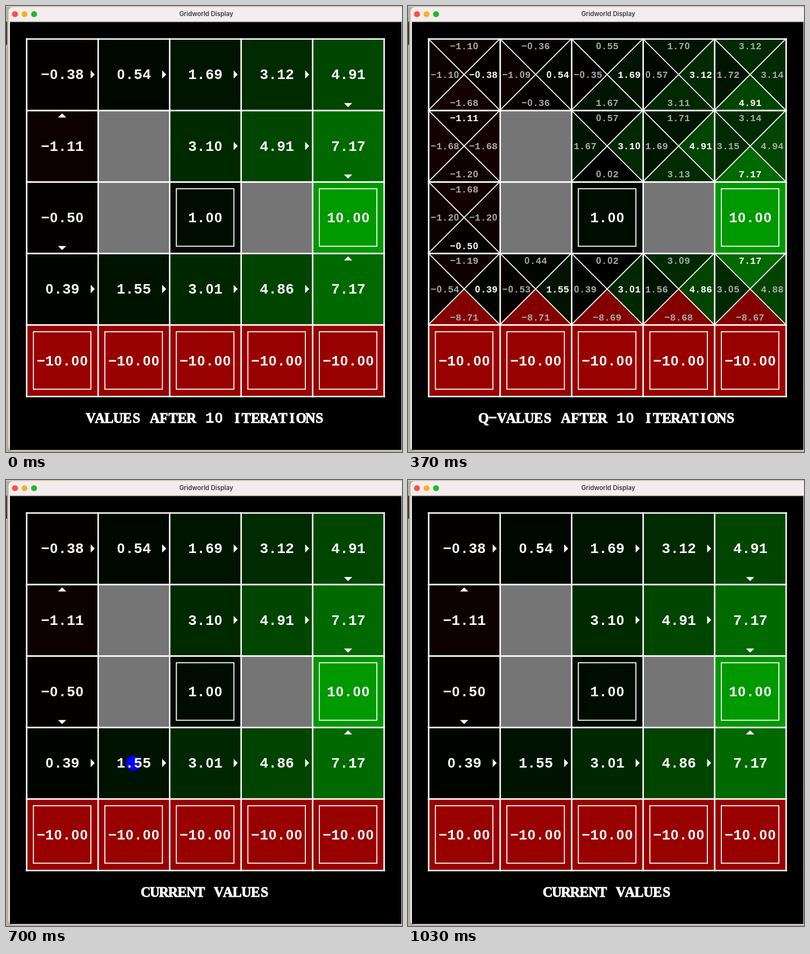
An HTML page with a canvas that plays this animation: 705x794 px, repeating every 1.06 s.

```html
<!DOCTYPE html>
<html lang="en">
<head>
<meta charset="utf-8">
<title>Gridworld Display</title>
<style>
html, body { margin: 0; width: 100%; height: 100%; overflow: hidden; background: #000; }
canvas { display: block; }
</style>
</head>
<body>
<canvas id="stage" width="705" height="794"></canvas>
<script>
const ctx = document.getElementById('stage').getContext('2d');
const LOOP = 1060, Q_START = 130, RUN_START = 570, STEP = 72;
const LEFT = 36.8, TOP = 58.8, SIZE = 127.28, HALF = SIZE / 2, INSET = -0.5;
const MONO = '"Liberation Mono", "DejaVu Sans Mono", monospace';
const SANS = '"Liberation Sans", Arial, sans-serif';
const SERIF = '"Liberation Serif", "Noto Serif", serif';

// Markov decision process: walls '#', exits by reward, everything else open.
const layout = ['     ', ' #   ', ' #1#+', '     ', '-----'];
const exits = { '1': 1, '+': 10, '-': -10 };
const DISCOUNT = 0.8, NOISE = 0.01, LIVING = -0.8, ITERATIONS = 10;
const dirs = [[0, -1], [-1, 0], [1, 0], [0, 1]]; // north, west, east, south

const kind = (c, r) => layout[r]?.[c] ?? '#';
const mapCells = fn => layout.map((row, r) => [...row].map((k, c) => fn(c, r, k)));

function move(c, r, [dx, dy]) {
  return kind(c + dx, r + dy) === '#' ? [c, r] : [c + dx, r + dy];
}

function qValues(values, c, r) {
  const after = (dx, dy) => {
    const [x, y] = move(c, r, [dx, dy]);
    return values[y][x];
  };
  return dirs.map(([dx, dy]) => LIVING + DISCOUNT * ((1 - NOISE) * after(dx, dy) +
    NOISE / 2 * (after(dy, dx) + after(-dy, -dx))));
}

function solve() {
  let values = mapCells(() => 0);
  for (let i = 0; i < ITERATIONS; i++) {
    const last = values;
    values = mapCells((c, r, k) => exits[k] ?? Math.max(...qValues(last, c, r)));
  }
  return values;
}

const values = solve();
const qs = mapCells((c, r) => qValues(values, c, r));
const bestDir = (c, r) => dirs[qs[r][c].indexOf(Math.max(...qs[r][c]))];

// The agent follows the best action from its start cell until it exits.
const route = [[0, 3]];
for (let at = route[0]; !(kind(...at) in exits);) {
  at = move(...at, bestDir(...at));
  route.push(at);
}

function shade(v) {
  const c = Math.round(153 * Math.pow(Math.abs(v) / 10, 1.12));
  return v < 0 ? `rgb(${c},0,0)` : `rgb(0,${c},0)`;
}

function poly(points, color) {
  ctx.fillStyle = color;
  ctx.beginPath();
  points.forEach(([x, y]) => ctx.lineTo(x, y));
  ctx.fill();
}

function dot(x, y, r, color) {
  ctx.fillStyle = color;
  ctx.beginPath();
  ctx.arc(x, y, r, 0, 2 * Math.PI);
  ctx.fill();
}

function line(x1, y1, x2, y2) {
  ctx.beginPath();
  ctx.moveTo(x1, y1);
  ctx.lineTo(x2, y2);
  ctx.stroke();
}

// Fixed-pitch lettering: slab-like capitals, plain zeros, wide minus signs.
function write(text, x, y, size, color, align = 0.5) {
  const pitch = size * 0.6;
  ctx.fillStyle = ctx.strokeStyle = color;
  ctx.textAlign = 'center';
  ctx.textBaseline = 'alphabetic';
  ctx.lineWidth = 0.9;
  [...text].forEach((ch, i) => {
    const cx = x + (i + 0.5 - text.length * align) * pitch;
    const capital = /[A-Z]/.test(ch);
    const [scale, family] = capital ? [0.9, SERIF] : ch === '0' ? [0.97, SANS] : [1, MONO];
    ctx.font = `bold ${size * scale}px ${family}`;
    ctx.fillText(ch === '-' ? '\u2212' : ch, cx, y);
    if (capital) ctx.strokeText(ch, cx, y);
  });
}

function drawWindow() {
  ctx.fillStyle = '#b5b0a3';
  ctx.fillRect(0, 0, 705, 794);
  ctx.fillStyle = '#d9c8bd';
  ctx.fillRect(0, 0, 705, 2);
  ctx.fillStyle = '#3a3426';
  ctx.fillRect(0, 28, 2, 41);
  ctx.fillStyle = '#f3eeed';
  ctx.beginPath();
  ctx.roundRect(4.5, 2, 710, 790, 8);
  ctx.fill();
  ctx.fillStyle = '#d2cdcc';
  ctx.fillRect(5, 27, 700, 1);
  ctx.fillStyle = '#000';
  ctx.fillRect(7, 28.5, 697, 762);
  ['#fb4f48', '#fdb025', '#20b92f'].forEach((c, i) => dot(16 + 17 * i, 14.5, 5.3, c));
  ctx.fillStyle = '#3d3a3a';
  ctx.font = '600 11.2px Inter, sans-serif';
  ctx.textAlign = 'center';
  ctx.textBaseline = 'alphabetic';
  ctx.fillText('Gridworld Display', 356.5, 18);
}

function fillCell(x, y, color) {
  ctx.fillStyle = color;
  ctx.fillRect(x - HALF, y - HALF, SIZE, SIZE);
}

function drawArrow(x, y, [dx, dy]) {
  const at = (along, side) => [x + dx * along - dy * side, y + dy * along + dx * side];
  poly([at(58, 0), at(50.8, 7.4), at(50.8, -7.4)], '#fff');
}

function drawQ(x, y, q) {
  const corner = (a, b) => [x + a * HALF, y + b * HALF];
  dirs.forEach(([dx, dy], i) => {
    poly([[x, y], corner(dx - dy, dy + dx), corner(dx + dy, dy - dx)], shade(q[i]));
  });
  ctx.strokeStyle = '#fff';
  ctx.lineWidth = 1.7;
  line(...corner(-1, -1), ...corner(1, 1));
  line(...corner(-1, 1), ...corner(1, -1));

  const best = Math.max(...q);
  dirs.forEach(([dx, dy], i) => {
    const color = q[i] === best ? '#fff' : '#a8a8a8';
    write(q[i].toFixed(2), x + dx * 59.6, y + 5.8 + dy * 50.4, 16.97, color, (dx + 1) / 2);
  });
}

function drawCell(c, r, k, showQ, ball) {
  const x = LEFT + (c + 0.5) * SIZE + INSET, y = TOP + (r + 0.5) * SIZE + INSET;
  if (k === '#') return fillCell(x, y, '#757575');
  const exit = k in exits;
  if (showQ && !exit) return drawQ(x, y, qs[r][c]);

  fillCell(x, y, shade(values[r][c]));
  if (exit) {
    ctx.strokeStyle = '#fff';
    ctx.lineWidth = 1.8;
    ctx.strokeRect(x - 51.2, y - 51.2, 102.4, 102.4);
  } else {
    drawArrow(x, y, bestDir(c, r));
  }
  if (ball) dot(x - 0.5, y + 0.3, 13.4, '#00f');
  write(values[r][c].toFixed(2), x + 0.4, y + 8.5, 25.46, '#fff');
}

function draw(t) {
  const running = t >= RUN_START;
  const showQ = t >= Q_START && !running;
  const spot = running && route[Math.floor((t - RUN_START) / STEP)];
  drawWindow();
  mapCells((c, r, k) => drawCell(c, r, k, showQ, spot && spot[0] === c && spot[1] === r));

  ctx.strokeStyle = '#fff';
  ctx.lineWidth = 2.6;
  ctx.lineCap = 'square';
  for (let i = 0; i <= 5; i++) {
    const d = i * SIZE;
    line(LEFT + d, TOP, LEFT + d, TOP + 5 * SIZE);
    line(LEFT, TOP + d, LEFT + 5 * SIZE, TOP + d);
  }
  ctx.lineCap = 'butt';
  const caption = running ? 'CURRENT VALUES'
    : `${showQ ? 'Q-VALUES' : 'VALUES'} AFTER ${ITERATIONS} ITERATIONS`;
  write(caption, 354.4, 741.8, 27.16, '#fff');
}

const start = performance.now();
function tick() {
  draw((performance.now() - start) % LOOP);
  requestAnimationFrame(tick);
}
tick();
</script>
</body>
</html>
```
